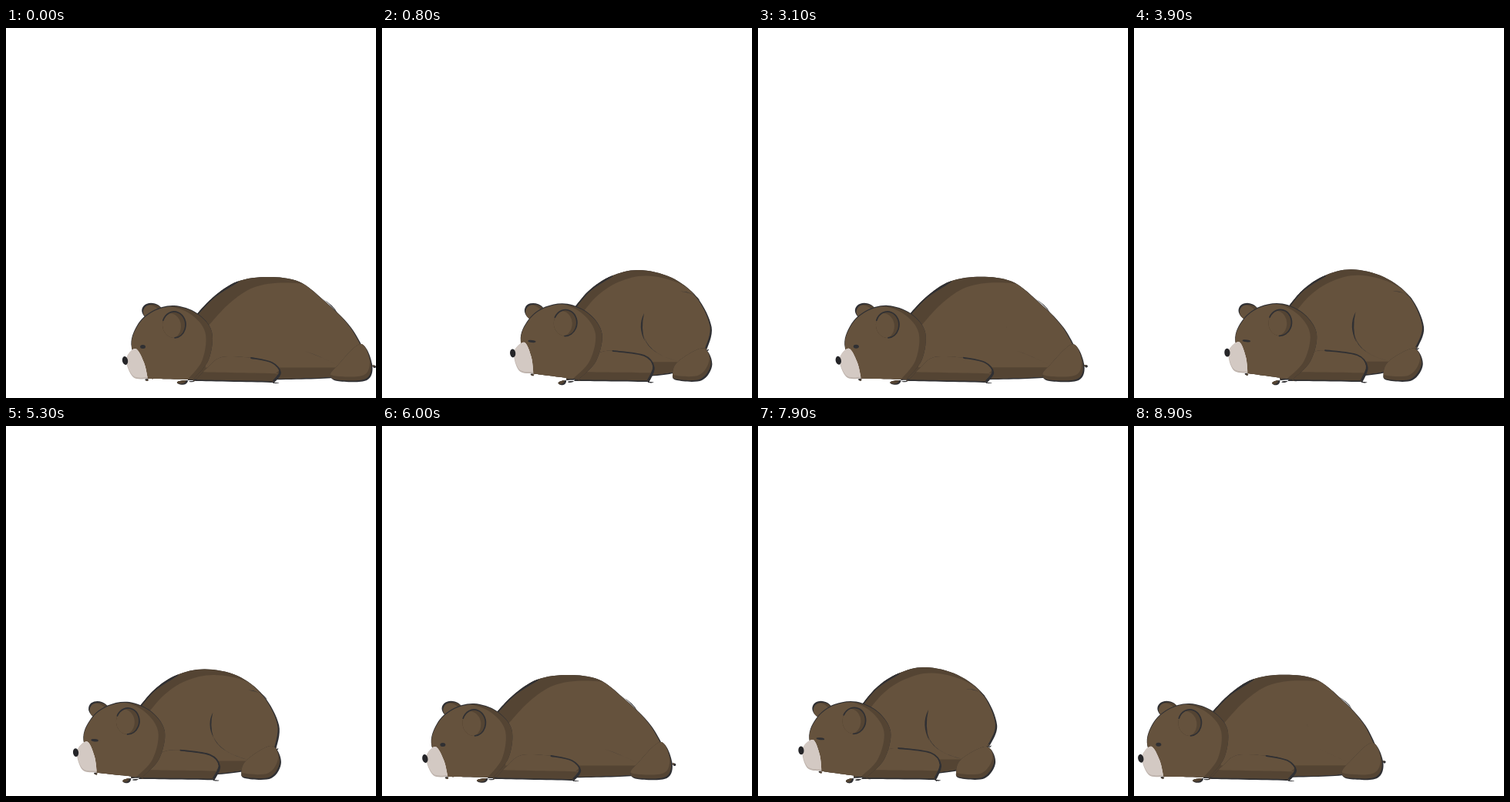
An HTML page with a canvas for the animation above (9 s loop, 480 by 480 pixels).

```html
<!DOCTYPE html>
<html>
<head>
<meta charset="utf-8">
<style>
html, body { margin: 0; width: 100%; height: 100%; overflow: hidden; background: #fff; }
canvas { display: block; }
</style>
</head>
<body>
<canvas id="stage" width="480" height="480"></canvas>
<script>
const ctx = document.getElementById('stage').getContext('2d');
const FUR = '#65523d', SHADE = '#544433', INK = '#303033', PALE = '#d3c9c3', DULL = '#bfb4ad';
const LOOP = 9000, STEP = 100, CYCLE = 3000, SPEED = 0.01644, TUCK_X = 64;

const clamp = v => Math.max(0, Math.min(1, v));
const mix = (a, b, k) => a + (b - a) * k;
const wave = u => (1 - Math.cos(Math.PI * u)) / 2;

// Key points; a trailing "c" doubles a point, which makes a corner.
const points = text => text.split(' ').flatMap(p => {
  const xy = p.replace('c', '').split(',').map(Number);
  return p.endsWith('c') ? [xy, xy] : [xy];
});
const shape = (long, tucked) => ({ long: points(long), tucked: points(tucked) });

const body = shape(
  '240,380c 268,350 300,329 340,323 380,329 412,353 448,389 475,438c 425,454 236,457c',
  '190,376c 218,341 248,321 283,313 325,323 359,349 376,388 366,416c 325,447 190,457c');
const foot = shape(
  '430,438 460,410 475,436 468,457 430,458 421,450',
  '330,432 362,416 374,436 360,457 328,457 323,449');
const arm = shape(
  '262,440 280,427 318,428 345,434 356,447 347,460c 245,458c',
  '222,430 232,421 248,418 290,424 303,440 296,459c 200,458c');
const hip = shape('387,419 411,427 431,438', '286,400 293,424 331,432');
const thigh = shape('374,388 374,388 374,388', '287,368 277,387 288,408');
const crease = shape('408,350 419,356 430,370', '336,341 351,340 361,352');
const head = points('163,415 170,386 190,367 218,360 248,370 267,394 263,430 243,456c 184,455c');
const muzzle = points('156,430 168,416 179,434 184,455c 165,453');

// How far the front and the rear are pulled together, for seconds into a cycle.
function tuck(s) {
  if (s < 2) return { front: wave(clamp(s)), rear: wave(clamp(s)) };
  return { front: 1 - wave((s - 2) ** 0.9), rear: 1 - (s - 2) ** 1.5 };
}

const pose = ({ long, tucked }, { front, rear }) => long.map(([x, y], i) => {
  const k = mix(front, rear, clamp((x - 350) / 35));
  return [mix(x, tucked[i][0] + TUCK_X, k), mix(y, tucked[i][1], k)];
});

function spline(pts, closed = true) {
  const n = pts.length;
  const at = i => closed ? pts[(i + n) % n] : pts[Math.max(0, Math.min(n - 1, i))];
  ctx.beginPath();
  ctx.moveTo(...pts[0]);
  for (let i = 0; i < (closed ? n : n - 1); i++) {
    const [p, a, b, q] = [at(i - 1), at(i), at(i + 1), at(i + 2)];
    ctx.bezierCurveTo(
      a[0] + (b[0] - p[0]) / 6, a[1] + (b[1] - p[1]) / 6,
      b[0] - (q[0] - a[0]) / 6, b[1] - (q[1] - a[1]) / 6, ...b);
  }
}

function oval(x, y, rx, ry, turn = 0, from = 0, to = 7) {
  ctx.beginPath();
  ctx.ellipse(x, y, rx, ry, turn, from, to);
}

function paint(color) {
  ctx.fillStyle = color;
  ctx.fill();
}

function stroke(width) {
  ctx.strokeStyle = INK;
  ctx.lineWidth = width;
  ctx.stroke();
}

// Rim, shadow and light are one outline, shifted twice inside itself.
function solid(trace, rim, light, colors = [INK, SHADE, FUR]) {
  ctx.save();
  [[0, 0], rim, light].forEach((shift, i) => {
    ctx.translate(...shift);
    trace();
    paint(colors[i]);
    ctx.clip();
  });
  ctx.restore();
}

// A curved fold, thickest in the middle.
function fold([a, mid, b], width) {
  ctx.beginPath();
  ctx.moveTo(...a);
  ctx.quadraticCurveTo(...mid, ...b);
  ctx.quadraticCurveTo(mid[0] + width, mid[1] + width / 2, ...a);
  paint(INK);
}

function withHead(k, drawing) {
  ctx.save();
  ctx.translate(225 + 34 * k, 405 - 2 * k);
  ctx.rotate(0.12 * k);
  ctx.translate(-225, -405);
  drawing();
  ctx.restore();
}

function drawBody(move) {
  const k = move.front;
  const back = pose(body, move), limb = pose(arm, move), heel = pose(foot, move);
  solid(() => spline(back), [-2.4, -1.5], [mix(24, 11, k), 9]);
  ctx.save();
  spline(back);
  ctx.clip();
  spline(back.slice(0, 4), false);
  stroke(3);
  ctx.translate(-2, -1.5);
  spline(back);
  ctx.clip();
  ctx.fillStyle = SHADE;
  ctx.fillRect(0, mix(442, 434, k), 600, 40);
  ctx.restore();

  solid(() => spline(heel), [-1.8, -1.8], [-2, -5]);
  fold(pose(crease, move), 6);
  fold(pose(hip, move), -3);
  fold(pose(thigh, move), 5 * k);
  solid(() => spline(limb), [-1.8, -1.8], [5, -10]);
  spline(limb.slice(2, 6), false);
  stroke(1.8);
}

function drawHead(k) {
  solid(() => spline(head), [0.5, 1.2], [-9, 0]);
  solid(() => oval(218, 385, 15, 17), [0, 0], [-6, 2], [SHADE, SHADE, FUR]);
  oval(218, 385, 15, 17, 0, -2.8, 1.5);
  stroke(1.7);
  solid(() => spline(muzzle), [0, -2], [0, 0], [DULL, PALE, PALE]);
  oval(154.5, 431.5, 3.6, 5.5, -0.2);
  paint('#252528');
  oval(177.5, 413.5, mix(3.5, 5.3, k), mix(2.5, 1.4, k));
  paint(INK);
}

const start = performance.now();
function draw() {
  const elapsed = Math.max(0, performance.now() - start) % LOOP;
  const t = Math.floor(elapsed / STEP) * STEP;
  const move = tuck(t % CYCLE / 1000), k = move.front;
  ctx.clearRect(0, 0, 480, 480);
  ctx.save();
  ctx.lineCap = ctx.lineJoin = 'round';
  ctx.translate(-t * SPEED, 0);
  drawBody(move);
  withHead(k, () => {
    solid(() => oval(190 - 14 * k, 368 + 8 * k, 14, 11, 0.3), [1.8, 1.8], [-5, 1]);
    drawHead(k);
  });
  ctx.restore();
  requestAnimationFrame(draw);
}
draw();
</script>
</body>
</html>
```
